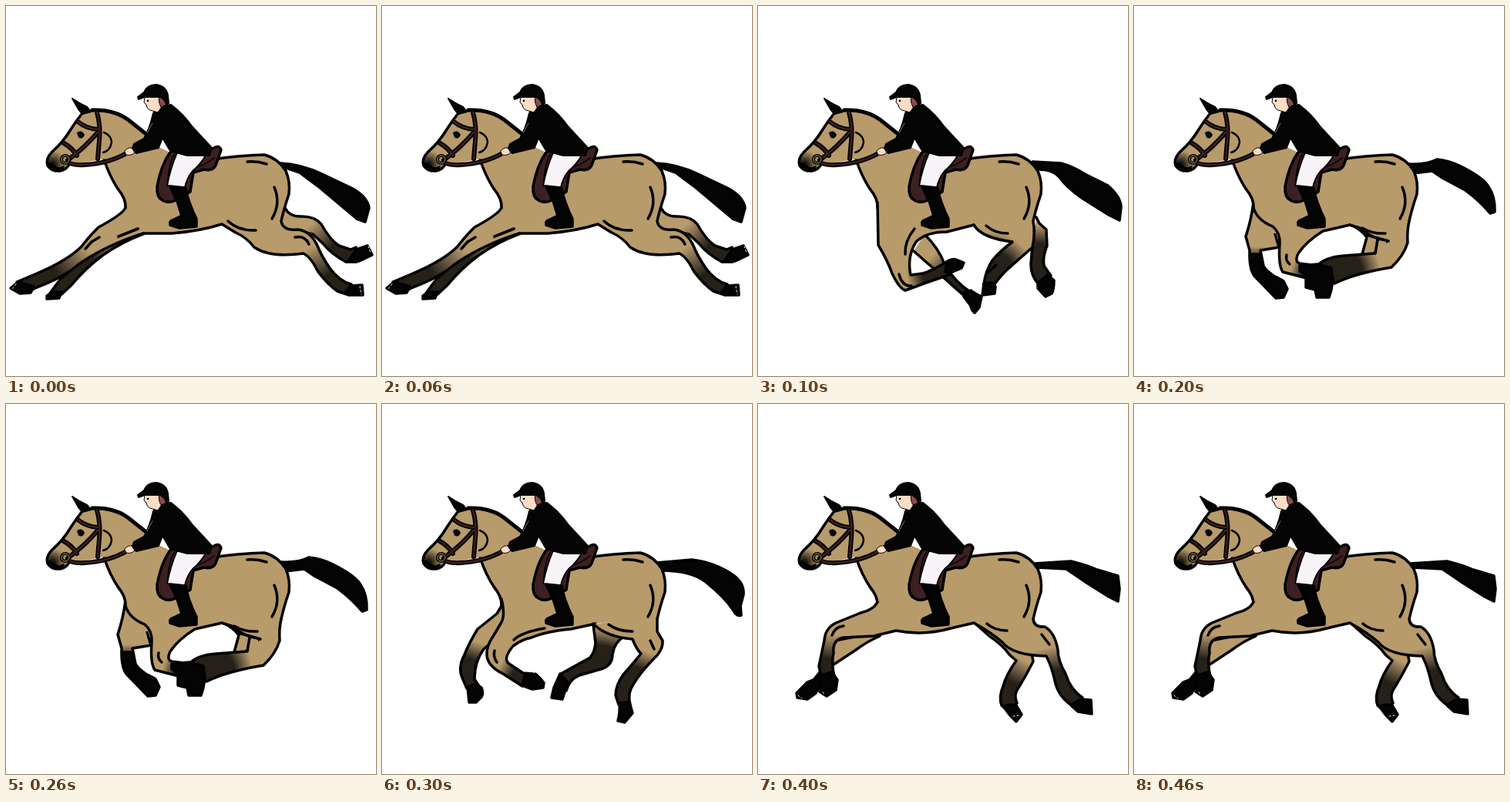
These frames come from a looping animation (480 by 480 pixels, 0.5 s). An HTML page without scripts:

```html
<!DOCTYPE html>
<html lang="en">
<head>
<meta charset="utf-8">
<title>Galloping horse</title>
<style>
  html, body { margin: 0; width: 100%; height: 100%; overflow: hidden; background: #fff; }
  svg { display: block; width: 100%; height: 100%; }
  path { stroke: #000; stroke-width: 3.5; stroke-linecap: round; stroke-linejoin: round; }
  .line { fill: none; }
  .coat { fill: #b89b6b; }
  .black { fill: #040404; stroke-width: 3.5; }
  .leather { fill: #3d2021; }
  .skin { fill: #fcdcc5; stroke-width: 1; }
  .strap { stroke: #000; stroke-width: 6; }
  .strap.inner { stroke: #3b1d20; stroke-width: 2.5; }
  .strap path, path.strapping { fill: none; stroke: inherit; stroke-width: inherit; }
  .bare { stroke: none; }
  .glint { fill: none; stroke: #fff; stroke-width: 1; stroke-dasharray: 2 3; }
  .pose { visibility: hidden; animation: pose 500ms step-end calc(var(--i) * 100ms - 500ms) infinite; }
  @keyframes pose { 0% { visibility: visible; } 20%, 100% { visibility: hidden; } }
</style>
</head>
<body>
<svg viewBox="0 0 480 480">
  <defs>
    <linearGradient id="fade" gradientUnits="userSpaceOnUse">
      <stop offset="0" stop-color="#b89b6b"/>
      <stop offset=".45" stop-color="#75634a"/>
      <stop offset="1" stop-color="#252119"/>
    </linearGradient>
    <!-- for folded legs, so the shading stays off the trunk -->
    <radialGradient id="spot" gradientUnits="userSpaceOnUse">
      <stop offset=".6" stop-color="#252119"/>
      <stop offset=".82" stop-color="#75634a"/>
      <stop offset="1" stop-color="#b89b6b"/>
    </radialGradient>
    <linearGradient id="reachA" href="#fade" x1="104" y1="312" x2="65" y2="345"/>
    <linearGradient id="reachB" href="#fade" x1="150" y1="304" x2="112" y2="326"/>
    <linearGradient id="reachC" href="#fade" x1="392" y1="314" x2="414" y2="350"/>
    <linearGradient id="reachD" href="#fade" x1="396" y1="282" x2="424" y2="310"/>
    <radialGradient id="tuckA" href="#spot" cx="243" cy="346" r="50"/>
    <linearGradient id="tuckB" href="#fade" x1="225" y1="325" x2="246" y2="348"/>
    <radialGradient id="tuckC" href="#spot" cx="300" cy="354" r="61"/>
    <linearGradient id="tuckD" href="#fade" x1="366" y1="284" x2="365" y2="308"/>
    <radialGradient id="foldA" href="#spot" cx="242" cy="352" r="40"/>
    <linearGradient id="foldB" href="#fade" x1="158" y1="312" x2="158" y2="327"/>
    <radialGradient id="foldC" href="#spot" cx="262" cy="348" r="58"/>
    <radialGradient id="liftA" href="#spot" cx="195" cy="362" r="48"/>
    <linearGradient id="liftB" href="#fade" x1="122" y1="308" x2="114" y2="330"/>
    <linearGradient id="liftC" href="#fade" x1="346" y1="322" x2="338" y2="344"/>
    <linearGradient id="liftD" href="#fade" x1="288" y1="292" x2="284" y2="313"/>
    <linearGradient id="landA" href="#fade" x1="92" y1="298" x2="88" y2="330"/>
    <linearGradient id="landC" href="#fade" x1="382" y1="314" x2="390" y2="345"/>
    <linearGradient id="landD" href="#fade" x1="345" y1="332" x2="330" y2="360"/>
    <radialGradient id="muzzle" gradientUnits="userSpaceOnUse" cx="60" cy="206" r="19">
      <stop offset=".2" stop-color="#1c1812"/>
      <stop offset="1" stop-color="#1c1812" stop-opacity="0"/>
    </radialGradient>

    <g id="body">
      <path class="coat bare" d="M114 135 Q145 135 161 149 L182 166 L212 190 L270 199 Q300 194 335 193 Q352 197 363 214 Q369 228 367 244 Q360 265 357 282 L280 284 Q250 294 215 295 L178 295 L156 264 Q156 252 145 238 Q136 222 126 192 L99 165 Z"/>
      <path class="line" d="M127 199 Q135 222 145 237 Q156 250 155 262 M268 199 Q300 194 335 193 Q352 197 363 214 Q369 228 367 244 Q360 265 357 279"/>
    </g>
    <path id="bridle" class="strapping" d="M118 138 Q123 155 121 175 L119 198 M93 150 Q104 159 119 160 M119 164 Q102 184 80 200 M75 178 Q86 184 92 194"/>
    <path id="rein" class="strapping" d="M80 202 Q85 207 102 206 Q135 204 158 190"/>
  </defs>

  <!-- full stretch -->
  <g class="pose" style="--i:0">
    <path class="black" d="M356 204 Q382 205 410 218 L450 237 Q469 248 471 262 L466 280 L455 276 L430 255 L405 234 L381 216 L360 209 Z"/>
    <path fill="url(#reachB)" d="M180 295 Q150 306 126 323 Q103 340 85 362 L72 374 L56 374 L70 355 L90 337 L145 293"/>
    <path class="black" d="M72 371 L69 379 L53 380 L53 376 L61 371 Z"/>
    <path fill="url(#reachD)" d="M362 262 Q368 274 384 273 Q401 273 409 283 Q420 303 432 311 L447 316 L454 313 L455 332 L441 332 Q422 322 411 308 L398 296 L357 288"/>
    <path class="black" d="M454 316 L469 311 L475 323 L458 331 L445 330 Z"/>
    <use href="#body"/>
    <path fill="url(#reachA)" d="M155 262 Q150 271 120 287 Q107 300 98 312 Q80 330 40 347 L14 358 L26 372 L40 365 Q75 352 93 336 Q108 325 128 315 Q155 302 178 295"/>
    <path class="coat" d="M178 295 L215 295 Q252 292 280 283"/>
    <path class="coat bare" d="M130 309 L175 293 L181 276 L158 264 L140 285 Z"/>
    <path class="black" d="M16 358 L6 366 L18 373 L32 372 L36 364 Z"/>
    <path fill="url(#reachC)" d="M280 283 L298 294 Q312 300 322 313 Q343 327 386 321 Q396 326 405 345 Q418 362 430 370 L445 375 L448 361 Q432 357 420 340 Q409 324 404 311 Q395 292 379 290 Q359 292 357 279"/>
    <path class="black" d="M447 363 L462 362 L463 375 L446 375 L441 370 Z"/>
    <path class="line" d="M103 315 L111 306 L121 300 M288 279 Q302 292 324 291 M375 300 Q388 297 393 309"/>
    <path class="line" style="stroke-width:4" d="M146 299 L171 289"/>
    <path class="glint" d="M470 312 L473 320 M459 364 L461 374 M13 361 L8 367"/>
  </g>

  <!-- hind legs swing under -->
  <g class="pose" style="--i:1">
    <path class="black" d="M356 202 L393 204 Q408 208 424 218 L454 233 Q471 248 471 261 L469 278 L455 271 L420 249 Q399 234 391 222 Q382 211 360 212 Z"/>
    <path fill="url(#tuckB)" d="M216 296 Q235 315 242 335 Q255 358 277 372 L270 378 Q250 361 234 346 L202 318"/>
    <path class="black" d="M267 371 Q272 372 276 369 Q284 375 290 377 L287 391 L281 398 Q277 395 276 389 L267 377 Z"/>
    <path fill="url(#tuckD)" d="M361 274 L365 282 L374 290 L375 311 Q369 325 371 337 L380 350 L364 361 Q354 350 354 335 L356 310"/>
    <path class="black" d="M376 349 L384 356 Q384 368 381 373 L373 377 L363 366 L363 359 Z"/>
    <use href="#body"/>
    <path fill="url(#tuckA)" d="M155 255 L156 310 Q168 330 174 347 Q183 366 191 369 L218 359 L250 348 L248 330 Q225 344 213 347 L198 349 Q193 325 205 306 Q218 293 245 293 L280 284"/>
    <path class="black" d="M245 332 Q252 327 257 329 L267 333 L264 340 L250 346 L243 345 Z"/>
    <path fill="url(#tuckC)" d="M280 284 Q290 301 330 306 Q314 318 304 330 Q295 344 293 361 L304 365 Q316 347 329 337 L356 313 Q360 295 357 279"/>
    <path class="black" d="M293 360 L304 359 L308 364 L307 373 L291 375 Z"/>
    <path class="line" d="M203 289 Q190 305 191 322 M183 348 Q187 364 199 363 M296 285 Q307 295 324 295 M309 336 L299 345"/>
  </g>

  <!-- gathered -->
  <g class="pose" style="--i:2">
    <path class="black" d="M356 205 Q380 206 393 199 Q410 201 424 208 Q452 222 459 233 Q469 247 468 267 L462 269 Q449 253 430 239 L400 223 L387 214 L362 217 Z"/>
    <path fill="url(#foldB)" d="M155 255 Q152 278 145 299 L150 317 Q149 344 158 352 L178 371 L192 360 Q172 345 168 337 L164 317 L188 313 L180 285"/>
    <path class="black" d="M152 322 L164 322 Q163 335 168 340 L181 350 Q192 355 194 357 L199 367 L194 378 L184 379 L157 351 L152 341 Z"/>
    <path class="coat" d="M281 284 Q295 290 302 300 L296 322 L312 326 L317 302 L330 290"/>
    <use href="#body"/>
    <path fill="url(#foldA)" d="M155 262 Q160 278 180 286 Q190 294 189 309 Q187 336 193 345 L224 353 L246 353 L247 338 L215 334 Q208 332 213 321 Q224 305 245 292 L280 284"/>
    <path fill="url(#foldC)" d="M280 284 L293 288 Q310 302 328 305 L311 321 L272 324 Q247 326 238 337 L236 357 L260 360 Q286 347 334 339 Q350 324 355 307 Q354 292 357 279"/>
    <path class="coat bare" d="M327 304 L316 305 L313 320 L327 318 Z"/>
    <path class="black" d="M238 335 L256 340 L258 355 L256 368 L253 378 L237 378 L235 368 L223 365 L223 354 L225 350 L215 344 L215 337 Z"/>
    <path class="line" d="M198 323 Q196 330 202 335 M296 288 Q310 296 326 295 M302 297 L330 305 M316 303 L313 321"/>
  </g>

  <!-- forelegs lift -->
  <g class="pose" style="--i:3">
    <path class="black" d="M356 206 L402 202 Q434 206 457 223 Q470 233 469 247 L465 262 L466 274 Q460 276 456 268 Q445 251 420 231 Q402 216 362 216 Z"/>
    <path fill="url(#liftB)" d="M155 262 L149 272 L124 292 Q113 310 107 325 Q98 342 104 355 L110 369 L128 369 L120 357 Q120 334 132 318 L150 302 L170 286"/>
    <path class="black" d="M111 367 L121 363 L129 368 Q132 375 129 380 L122 387 L113 387 Z"/>
    <path fill="url(#liftD)" d="M274 286 L277 310 Q276 322 270 329 L232 350 L224 368 L239 372 Q243 357 256 352 L287 343 Q299 338 299 325 Q302 308 314 302"/>
    <path class="black" d="M231 350 L241 361 L234 383 L220 381 L223 368 Z"/>
    <use href="#body"/>
    <path fill="url(#liftA)" d="M155 253 Q160 274 155 283 L145 300 Q135 314 136 326 Q137 340 157 350 L182 366 L196 350 L183 349 L165 337 Q156 331 170 314 Q182 305 194 303 Q212 295 245 292 L277 285"/>
    <path class="black" d="M185 352 Q195 354 199 350 Q207 357 210 362 L209 368 L195 370 L182 365 Z"/>
    <path fill="url(#liftC)" d="M274 285 Q290 302 325 305 Q330 318 336 324 Q326 336 313 351 Q303 365 303 378 L307 390 L322 390 Q318 375 326 364 Q335 348 357 326 Q365 316 364 307 L357 295 L357 279"/>
    <path class="black" d="M308 388 L321 387 L325 401 L315 413 L306 411 Q309 400 308 388 Z"/>
    <path class="line" d="M171 306 Q181 296 211 291 M146 320 Q144 328 149 335 M294 286 Q306 295 325 295 M348 307 L353 318"/>
  </g>

  <!-- forelegs reach -->
  <g class="pose" style="--i:4">
    <path class="black" d="M358 207 L406 204 Q426 209 440 215 L467 223 L469 240 L467 256 L455 250 L428 233 L400 214 L362 212 Z"/>
    <path class="coat" d="M158 301 Q140 309 127 319 L86 346 L88 330 L100 307 L150 297"/>
    <path class="black" d="M80 348 L91 347 L83 361 L75 375 L64 383 L51 381 L50 375 L64 361 L72 358 Z"/>
    <path fill="url(#landD)" d="M281 284 L300 301 Q317 312 327 326 L335 333 Q322 351 318 366 Q312 380 316 391 L324 397 L336 388 Q331 377 338 368 Q348 352 357 334 L354 316"/>
    <path class="black" d="M318 392 L327 390 L335 391 L342 403 L335 412 L327 404 Z"/>
    <use href="#body"/>
    <path fill="url(#landA)" d="M155 257 Q150 267 133 271 L101 284 Q87 291 86 307 L79 340 L82 354 L99 353 Q95 338 98 323 Q96 306 111 303 L150 301 L179 294 Q215 301 250 291 L280 284"/>
    <path class="black" d="M82 352 L96 348 L103 358 L101 371 L89 379 L80 373 Z"/>
    <path fill="url(#landC)" d="M280 284 Q302 296 317 309 Q330 326 374 327 Q381 340 386 363 Q390 378 404 389 L416 395 L421 381 Q405 370 399 350 Q389 333 389 319 Q385 296 372 289 Q358 290 357 279"/>
    <path class="black" d="M418 383 L432 384 L433 402 L415 399 L406 391 Z"/>
    <path class="line" d="M96 300 Q100 289 111 288 M297 285 Q307 294 323 294 M368 299 L378 312"/>
    <path class="glint" d="M52 378 L57 382 M84 374 L88 377 M331 405 L339 404"/>
  </g>

  <!-- head and bridle -->
  <path class="line" d="M313 202 Q326 201 338 205 M348 235 Q357 256 345 276"/>
  <path class="coat bare" d="M114 136 L99 139 Q91 149 84 160 Q74 177 60 189 Q51 198 54 207 Q59 215 70 214 Q77 213 81 207 L130 198 L140 140 Z"/>
  <path class="bare" fill="url(#muzzle)" d="M70 180 L60 189 Q51 198 54 207 Q59 215 70 214 Q77 213 81 207 L84 195 Z"/>
  <path class="line" d="M111 136 L99 139 Q91 149 84 160 Q74 177 60 189 Q51 198 54 207 Q59 215 70 214 Q77 213 81 207"/>
  <path class="black" style="stroke-width:2" d="M86 120 Q96 127 105 131 L110 137 L99 140 L94 134 Z"/>
  <path class="line" style="stroke-width:5" d="M112 135 Q141 134 159 148 L183 167"/>
  <path class="line" style="stroke-width:2.5" d="M127 164 Q137 168 137 177 Q135 188 126 190"/>
  <path class="black" style="stroke-width:2" d="M93 165 Q97 161 101 167 Q99 172 95 170 Z"/>
  <path class="black" style="stroke-width:2" d="M54 205 Q58 203 62 207 Q68 213 75 208 L72 214 L61 213 Z"/>
  <g class="strap"><use href="#bridle"/><use href="#rein"/></g>
  <g class="strap inner"><use href="#bridle"/><use href="#rein"/></g>
  <circle cx="77" cy="199" r="5" fill="none" stroke="#000" stroke-width="4"/>
  <circle cx="77" cy="199" r="5" fill="none" stroke="#b89b6b"/>

  <!-- saddle and rider -->
  <path class="leather" d="M214 188 Q201 206 196 234 Q195 248 203 252 Q211 257 222 251 L239 241 L243 216 L257 212 Q270 215 273 204 L279 187 Q277 180 270 184 L255 193 Z"/>
  <path class="line" style="stroke-width:1.5" d="M244 210 Q258 207 270 197 M218 193 Q211 205 210 226"/>
  <path fill="#f8f3f7" style="stroke-width:2" d="M222 190 L259 194 Q252 206 242 214 Q234 224 232 236 L209 233 Q213 211 222 190 Z"/>
  <path class="black" d="M213 234 L233 236 Q236 254 247 276 L247 286 L225 288 L213 284 Q211 279 218 277 L228 272 L222 253 Z"/>
  <path class="bare" fill="#fff" d="M203 168 L216 185 L211 189 L198 183 Z"/>
  <path class="black" style="stroke-width:2" d="M200 130 L214 128 Q230 140 242 157 L267 184 L264 194 L235 194 L213 188 L203 171 L198 184 L169 191 L163 187 L166 179 L179 172 Q187 158 191 139 Z"/>
  <path class="line" style="stroke:#777;stroke-width:1" d="M183 165 L190 152"/>
  <path class="skin" d="M154 188 Q158 183 163 184 L167 190 Q162 195 156 193 Z"/>
  <path class="skin" d="M180 118 L179 125 L182 128 Q183 135 190 136 L197 138 L203 129 L200 117 Z"/>
  <path fill="#884a4c" style="stroke-width:1" d="M199 117 L208 118 L209 128 L201 131 Q197 124 199 117 Z"/>
  <path class="black" style="stroke-width:2" d="M171 118 L179 112 Q183 102 195 102 Q208 104 210 116 L211 126 L208 129 Q207 121 200 118 L180 118 L172 121 Z"/>
  <circle cx="184" cy="123" r="1.3"/>
</svg>
</body>
</html>
```
